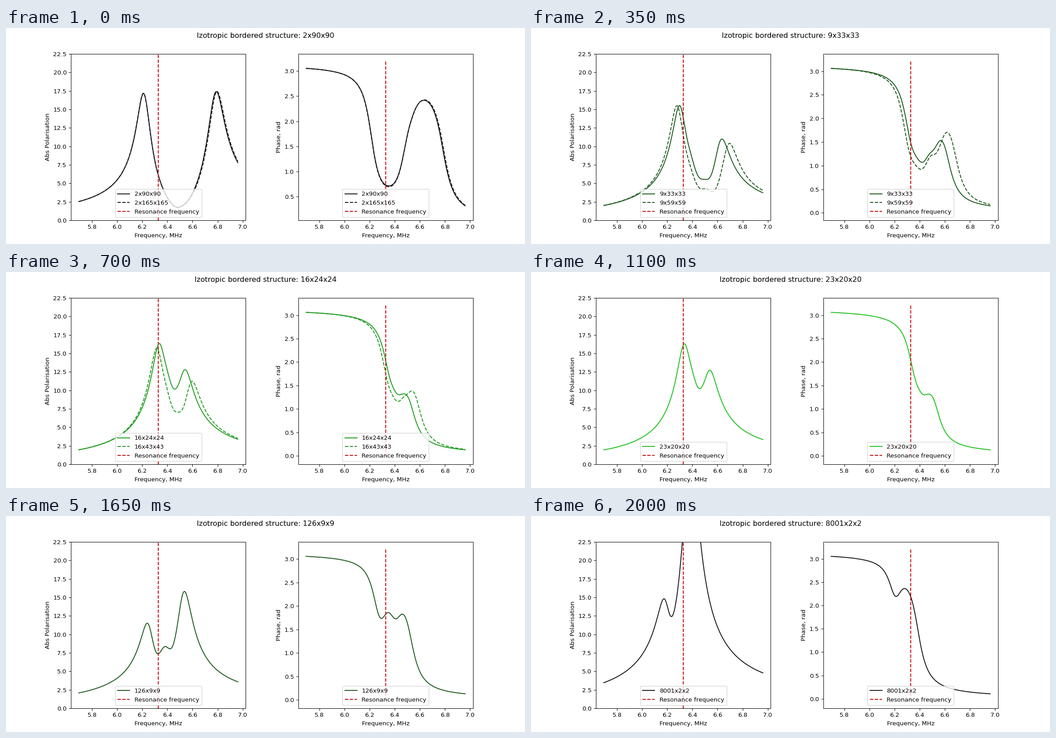
A matplotlib script for the animation above (2050 ms loop, 1159 by 483 pixels).

```python
import numpy as np
import matplotlib.pyplot as plt
from matplotlib.animation import FuncAnimation

WIDTH, HEIGHT, DPI = 1159, 483, 96.6
FRAMES = 41
F0 = 6.328            # resonance frequency, MHz
DAMP = 0.06
FREQ = np.linspace(0.9 * F0, 1.1 * F0, 500)
DETUNE = F0 / 2 * (1 - (F0 / FREQ) ** 2)


def modes(n, m):
    """Detuning and strength of the four modes of an n x m x m block."""
    a, b = 1 / n, 1 / m
    x = n / (n + m)
    plate = max(0, 1 - x / 0.4) ** 1.5
    rod = max(0, (x - 0.55) / 0.45)
    return (
        (.018 - .1 * (plate + rod) - .037 * a - .063 * b,
         .74 + .2 * plate - .24 * rod + .09 * a),
        (.07 - .05 * plate - .03 * rod,
         .23 * (1 - plate) - .1 * rod - .13 * b),
        (.14 + .05 * plate - .09 * rod,
         (.11 + .06 * rod) * (1 - .9 * a) * (1 - b)),
        (.2 + .22 * plate + .01 * rod - .155 * b,
         .45 + .5 * a + .4 * rod + 1.2 * b * b),
    )


def response(n, m):
    """Complex polarisation as a sum of damped resonances."""
    loss = 1j * DAMP * F0 / FREQ
    return sum(amp / (DETUNE - pos - loss) for pos, amp in modes(n, m)) - 0.06


def side(cells, n):
    return round((cells / n) ** 0.5)


def block(k):
    """Plates thicken up to a cube, then rods get thinner."""
    if k <= 20:
        return k + 1, side(20 ** 3, k + 1)
    m = FRAMES - k
    return round(20 ** 3 / m ** 2), m


def name(n, m):
    return f"{n + 1}x{m + 1}x{m + 1}"


# A hair over the stage size, as the canvas rounds down to whole pixels.
fig, axes = plt.subplots(
    1, 2, dpi=DPI, figsize=((WIDTH + .01) / DPI, (HEIGHT + .01) / DPI))
fig.subplots_adjust(left=.125, right=.9, bottom=.11, top=.88, wspace=.3)
title = fig.suptitle("")
solid, dashed, marks = [], [], []
for ax, label in zip(axes, ("Abs Polarisation", "Phase, rad")):
    solid += ax.plot([], [], "-")
    dashed += ax.plot([], [], "--")
    marks += ax.plot([F0, F0], [0, 22.5], "--", color="#cc0a0e",
                     label="Resonance frequency")
    ax.set_xlim(0.89 * F0, 1.11 * F0)
    ax.set_xlabel("Frequency, MHz")
    ax.set_ylabel(label)
axes[0].set_ylim(0, 22.5)


def fill(lines, n, m, color):
    """Plot one block in both axes and return its phase."""
    wave = response(n, m)
    phase = np.angle(wave)
    for line, values in zip(lines, (np.abs(wave), phase)):
        line.set_data(FREQ, values)
        line.set_label(name(n, m))
        line.set_color(color)
    return phase


def draw(k):
    n, m = block(k)
    paired = k < 20
    color = (.12, .1 + .0365 * min(k, 40 - k), .12)
    phases = [fill(solid, n, m, color)]
    if paired:
        phases.append(fill(dashed, n, side(30 ** 3, n), color))

    low, high = np.min(phases), np.max(phases)
    pad = .05 * (high - low)
    marks[1].set_ydata([low - pad, high + pad])
    axes[1].set_ylim(low - 2.1 * pad, high + 2.1 * pad)

    for ax, main, pair, mark in zip(axes, solid, dashed, marks):
        pair.set_visible(paired)
        handles = [main, pair, mark] if paired else [main, mark]
        ax.legend(handles=handles, loc="lower center")
    title.set_text("Izotropic bordered structure: " + name(n, m))
    return []


anim = FuncAnimation(fig, draw, frames=FRAMES, interval=50,
                     init_func=lambda: draw(0), repeat=True, repeat_delay=0)
plt.show()
```
